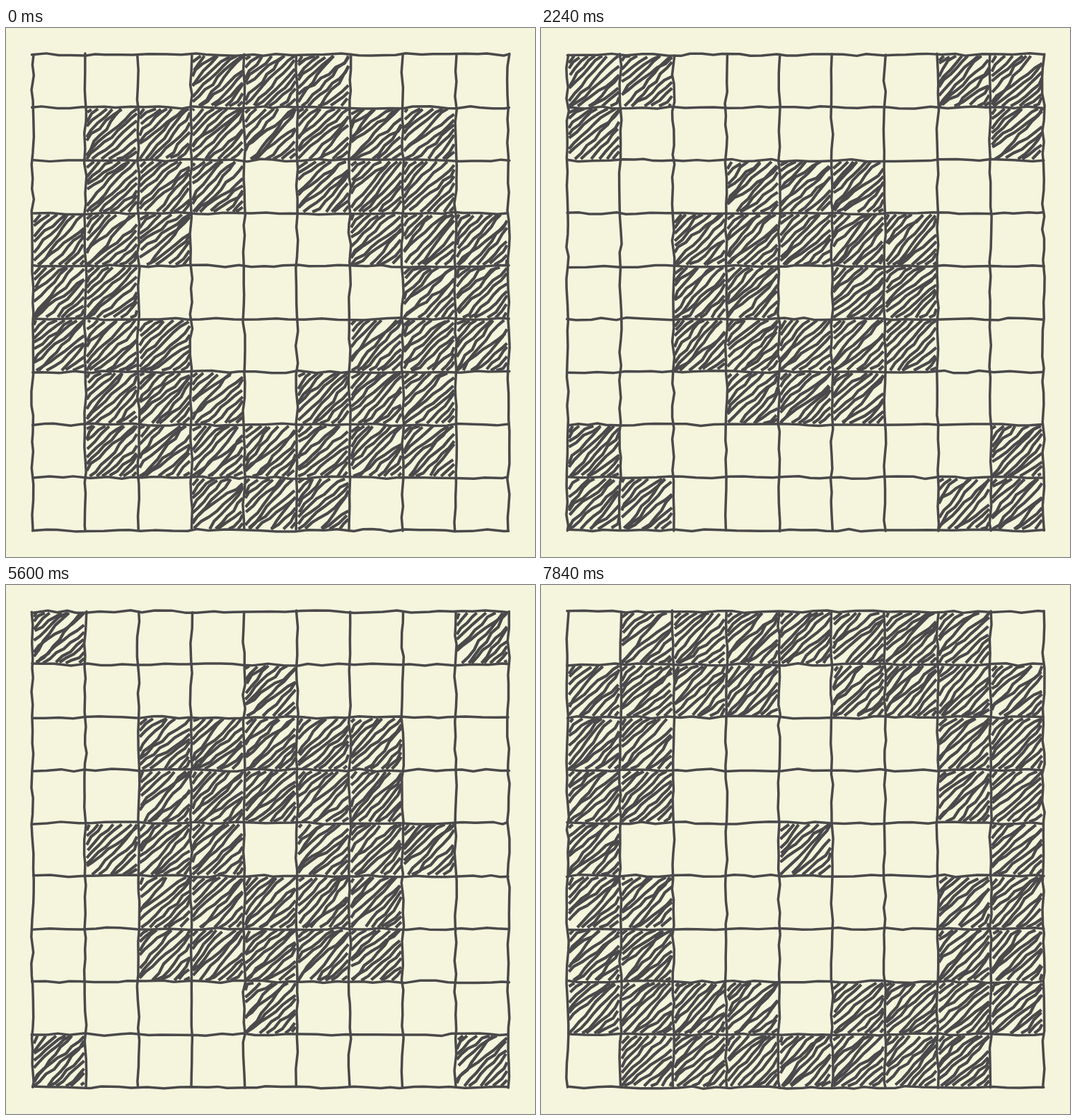
Write an HTML page with a canvas that moves like this. It is 748 px wide and 748 px high and loops after 8000 ms.

```html
<!DOCTYPE html>
<html lang="en">
<head>
<meta charset="utf-8">
<title>Sketched ripple</title>
<style>
  html, body { margin: 0; width: 100%; height: 100%; overflow: hidden; background: #f4f5dc; }
  canvas { display: block; width: 100vmin; height: 100vmin; }
</style>
</head>
<body>
<canvas id="stage"></canvas>
<script>
const SIZE = 748, CELLS = 9, START = 37.6, PITCH = 74.75;
const LOOP = 8000, HOLD = 1120;
const INK = '#4a494b', PAPER = '#f4f5dc';
// Inner radius of the dark ring in each pose, in cells.
const RINGS = [2.12, 3.45, 4.6, 1.28, 2.5, 0.85, 1.95, 3.1];
const BAND = 2.25;

const canvas = document.getElementById('stage');
const ctx = canvas.getContext('2d');
const scale = window.devicePixelRatio || 1;
canvas.width = canvas.height = Math.round(SIZE * scale);

let seed = 1;
function random() {
  seed = (seed + 0x6d2b79f5) | 0;
  let n = Math.imul(seed ^ (seed >>> 15), 1 | seed);
  n = (n + Math.imul(n ^ (n >>> 7), 61 | n)) ^ n;
  return ((n ^ (n >>> 14)) >>> 0) / 4294967296;
}
const jitter = amount => (random() * 2 - 1) * amount;
const clamp = (v, limit) => Math.max(-limit, Math.min(limit, v));

function stroke(points, width) {
  ctx.lineWidth = width;
  ctx.beginPath();
  points.forEach(([x, y]) => ctx.lineTo(x, y));
  ctx.stroke();
}

function gridLine(index, vertical) {
  const across = START + index * PITCH;
  const end = START + CELLS * PITCH + jitter(1.5);
  const points = [];
  for (let along = START + jitter(1.5); along < end - 6; along += 12 + random() * 14) {
    points.push([along, across + jitter(1.8)]);
  }
  points.push([end, across + jitter(1.2)]);
  stroke(vertical ? points.map(([a, b]) => [b, a]) : points, 3.5);
}

// Uneven diagonal pen strokes, kept inside one square.
function hatch(cx, cy) {
  const half = 37, edge = 35.5;
  for (let offset = -46 + jitter(2); offset < 48; offset += 7.4 + jitter(1.2)) {
    const angle = 0.76 + jitter(0.15);
    const c = Math.cos(angle), s = Math.sin(angle);
    const ox = offset * s, oy = offset * c;
    const from = Math.max((-half - ox) / c, (oy - half) / s) + jitter(4);
    const to = Math.min((half - ox) / c, (oy + half) / s) + jitter(4);
    if (to - from < 4) continue;
    const count = Math.max(1, Math.round((to - from) / 13));
    const points = [];
    for (let i = 0; i <= count; i++) {
      const t = from + (to - from) * i / count;
      const bend = jitter(2);
      points.push([
        cx + clamp(ox + t * c + bend * s, edge),
        cy + clamp(oy - t * s + bend * c, edge)
      ]);
    }
    stroke(points, 4.2);
  }
}

function isDark(col, row, inner) {
  const period = BAND * 2;
  const distance = Math.hypot(col - 4, row - 4) - inner;
  return ((distance % period) + period) % period < BAND;
}

function draw(pose) {
  seed = 977 + pose * 7919;
  ctx.setTransform(scale, 0, 0, scale, 0, 0);
  ctx.fillStyle = PAPER;
  ctx.fillRect(0, 0, SIZE, SIZE);
  ctx.strokeStyle = INK;
  ctx.lineJoin = 'round';
  for (let row = 0; row < CELLS; row++) {
    for (let col = 0; col < CELLS; col++) {
      if (isDark(col, row, RINGS[pose])) {
        hatch(START + (col + 0.5) * PITCH, START + (row + 0.5) * PITCH);
      }
    }
  }
  ctx.lineCap = 'round';
  for (let i = 0; i <= CELLS; i++) {
    gridLine(i, false);
    gridLine(i, true);
  }
  ctx.lineCap = 'butt';
}

const origin = performance.now();
let shown = -1;
function tick() {
  const time = Math.max(0, performance.now() - origin) % LOOP;
  const pose = Math.floor(time / HOLD);
  if (pose !== shown) draw(shown = pose);
  requestAnimationFrame(tick);
}
tick();
</script>
</body>
</html>
```
